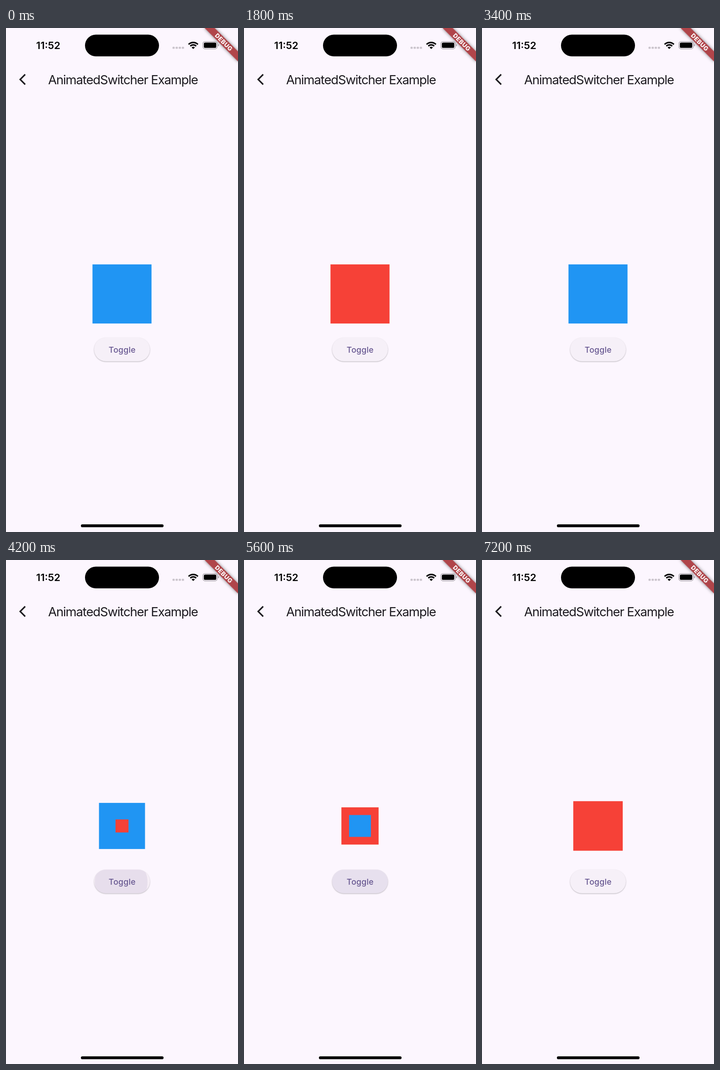
Write an HTML page that moves like this. It is 508 by 1102 pixels and loops after 7.3 s.

```html
<!DOCTYPE html>
<html lang="en">
<head>
<meta charset="utf-8">
<title>AnimatedSwitcher Example</title>
<style>
html, body { margin: 0; width: 100%; height: 100%; overflow: hidden; background: #fcf6fe; }
svg { display: block; width: 508px; height: 1102px; }
text { font-family: Inter, Roboto, sans-serif; font-optical-sizing: none; text-anchor: middle; }
.title { font-size: 27.5px; letter-spacing: -1.15px; fill: #1d1b20; }
.clock { font-size: 22px; font-weight: 600; }
.label { font-size: 17.6px; font-weight: 500; letter-spacing: .3px; fill: #65558f; }
.debug { font-size: 13.2px; font-weight: 800; letter-spacing: .5px; fill: #fff; }
.raised { filter: drop-shadow(0 1.3px 1.3px rgba(0, 0, 0, .28)); }
.banner { filter: drop-shadow(0 0 3.5px rgba(0, 0, 0, .5)); }
</style>
</head>
<body>
<svg viewBox="0 0 508 1102">
  <defs>
    <clipPath id="pill"><rect x="193" y="677" width="122" height="51.7" rx="25.85"/></clipPath>
  </defs>

  <!-- status bar -->
  <text class="clock" x="92.5" y="46">11:52</text>
  <rect x="173" y="14.5" width="162" height="47.5" rx="23.75"/>
  <g fill="#cbc5cd">
    <rect x="364.5" y="41" width="5" height="4.5" rx="1.5"/>
    <rect x="371.3" y="41" width="5" height="4.5" rx="1.5"/>
    <rect x="378.1" y="41" width="5" height="4.5" rx="1.5"/>
    <rect x="384.9" y="41" width="5" height="4.5" rx="1.5"/>
  </g>
  <path d="M399.8 35.8a14.4 14.4 0 0 1 20.4 0M403.6 39.6a9 9 0 0 1 12.8 0" fill="none" stroke="#000" stroke-width="3.2"/>
  <path d="M410 46l-3.6-3.6a5.1 5.1 0 0 1 7.2 0z"/>
  <rect x="431" y="29.6" width="31.6" height="16.2" rx="5" fill="none" stroke="#a5a0a7" stroke-width="1.3"/>
  <rect x="433.2" y="31.8" width="27.2" height="11.8" rx="3.2"/>
  <path d="M464.2 35q2 .8 2 2.7t-2 2.7z" fill="#a5a0a7"/>

  <!-- app bar -->
  <path d="M42 101.5L31 112.5L42 123.5" fill="none" stroke="#1d1b20" stroke-width="3.2"/>
  <text class="title" x="256" y="123">AnimatedSwitcher Example</text>

  <g transform="translate(508 0) rotate(45)">
    <rect class="banner" x="-51.7" y="36.2" width="103.4" height="15.5" fill="#b0454a"/>
    <text class="debug" x="0" y="48.7">DEBUG</text>
  </g>

  <rect id="leaving"/>
  <rect id="entering"/>

  <rect class="raised" x="193" y="677" width="122" height="51.7" rx="25.85" fill="#f6f0f8"/>
  <g clip-path="url(#pill)">
    <rect id="glow" x="193" y="677" width="122" height="52" fill="#f2e9f1"/>
    <circle id="ripple" fill="#655096"/>
  </g>
  <text class="label" x="254.3" y="709.8">Toggle</text>

  <rect x="164" y="1085.3" width="181" height="6.2" rx="3.1"/>
</svg>
<script>
const LOOP = 7300, STEP = 100, SWITCH = 500, HOLD = 171;
const taps = [1290, 2840, 4090, 5415, 6781];  // release times
const colors = ['#2095f3', '#f64137'];

const $ = id => document.getElementById(id);
const clamp = v => Math.min(1, Math.max(0, v));
const mix = (a, b, p) => a + (b - a) * p;
const smooth = p => p * p * (3 - 2 * p);

function set(id, attrs) {
  for (const name in attrs) $(id).setAttribute(name, attrs[name]);
}

function square(id, scale, fill) {
  const size = 129.26 * scale;
  set(id, { x: 254 - size / 2, y: 581.5 - size / 2, width: size, height: size, fill });
}

function drawSwitch(t) {
  const count = taps.filter(tap => tap <= t).length;
  const p = count ? clamp((t - taps[count - 1]) / SWITCH) : 1;
  square('leaving', 1 - p, colors[(count + 1) % 2]);
  square('entering', p, colors[count % 2]);
}

function drawRipple(t) {
  const tap = taps.find(tap => t >= tap - HOLD && t < tap + 375);
  const since = tap ? t - tap : 0;
  const held = tap ? since + HOLD : 0;
  // slow growth while held, fast after release
  const grow = smooth(clamp(Math.min(held, HOLD) / 1000 + Math.max(0, since) / 225));
  const alpha = clamp(held / 75) * (1 - clamp((since - 225) / 150));
  set('ripple', {
    cx: mix(247, 254, grow), cy: mix(708, 703, grow),
    r: mix(21.5, 71, grow), opacity: tap ? .1 * alpha : 0
  });
  set('glow', { opacity: tap ? clamp(held / 50) * (1 - clamp(since / 150)) : 0 });
}

const start = performance.now();
function frame() {
  const now = (performance.now() - start) % LOOP;
  const t = Math.floor(now / STEP) * STEP;
  drawSwitch(t);
  drawRipple(t);
  requestAnimationFrame(frame);
}
frame();
</script>
</body>
</html>
```
